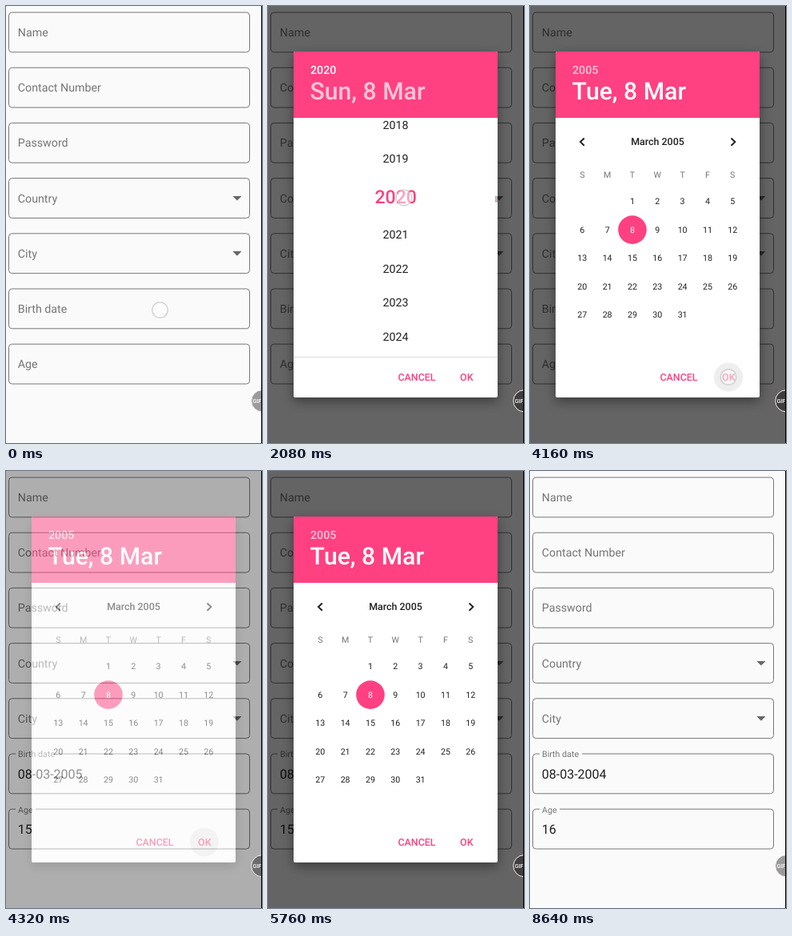
An HTML page that plays this animation: 320 px wide and 547 px high, repeating every 9600 ms.

```html
<!DOCTYPE html>
<html lang="en">
<head>
<meta charset="utf-8">
<title>Birth date picker</title>
<style>
  html, body { margin: 0; width: 100%; height: 100%; overflow: hidden; background: #fafafa; }
  svg { display: block; width: 100%; height: 100%; font-family: Roboto, sans-serif; text-rendering: geometricPrecision; }
  .dialog { filter: drop-shadow(0 5px 7px rgba(0, 0, 0, .4)); }
</style>
</head>
<body>
<svg id="stage" viewBox="0 0 320 547"></svg>
<script>
const LOOP = 9600, STEP = 160;
const PINK = '#ff4081', INK = '#212121', GREY = '#757575', PALE = 'rgba(255,255,255,.7)';
const ROW = 42.67;
const FIELDS = ['Name', 'Contact Number', 'Password', 'Country', 'City', 'Birth date', 'Age'];

// Each visit to the picker: fade in, open the year list, pick a year, confirm.
const VISITS = [
  { open: [320, 800], years: [1280, 1600], back: [3200, 3680], close: [4160, 4480], from: 2020, to: 2005 },
  { open: [5440, 5760], years: [6560, 6880], back: [7520, 7840], close: [8320, 8640], from: 2005, to: 2004 }
];

// start, end, x, y, vertical travel per step
const TOUCHES = [
  [0, 160, 192.5, 380.5, 0], [1120, 1440, 80, 87, 0], [2080, 2400, 170, 240, 80],
  [3040, 3360, 166, 248, 0], [4000, 4320, 248, 464.5, 0], [5280, 5600, 171.5, 376, 0],
  [6560, 6720, 76, 84, 0], [7520, 7680, 170, 191, 0], [8160, 8480, 248, 464.5, 0]
];

const ramp = (t, [a, b]) => Math.min(1, Math.max(0, (t - a) / (b - a)));
const during = (t, a, b) => t >= a && t < b;
const easeInOut = p => p * p * (3 - 2 * p);

// Text is placed by the vertical centre of its capitals.
const text = (s, x, y, size, fill, weight = 400, anchor = 'start') =>
  `<text x="${x}" y="${y + size * .357}" font-size="${size}" font-weight="${weight}" fill="${fill}" text-anchor="${anchor}">${s}</text>`;
const centred = (s, x, y, size, fill, weight) => text(s, x, y, size, fill, weight, 'middle');
const rect = (x, y, w, h, fill, extra = '') =>
  `<rect x="${x}" y="${y}" width="${w}" height="${h}" fill="${fill}" ${extra}/>`;
const circle = (x, y, r, fill, extra = '') =>
  `<circle cx="${x}" cy="${y}" r="${r}" fill="${fill}" ${extra}/>`;
const group = (opacity, content, extra = '') =>
  opacity > 0 ? `<g opacity="${opacity}" ${extra}>${content}</g>` : '';

function field(label, i, value) {
  const y = 8 + 69.2 * i;
  let out = rect(3.5, y, 301, 49.8, 'none', 'rx="4" stroke="#777"');
  if (value) {
    out += rect(12, y - 2, label === 'Age' ? 25 : 53, 4, '#fafafa');
    out += text(label, 15, y + .6, 10.67, GREY) + text(value, 14.8, y + 25, 16, INK);
  } else {
    out += text(label, 14.8, y + 25, 14.22, GREY);
  }
  if (label === 'Country' || label === 'City') {
    out += `<path d="M283.3 ${y + 22.3}h11.2l-5.6 5.6z" fill="#666"/>`;
  }
  return out;
}

function form(year) {
  const values = year ? { 'Birth date': '08-03-' + year, Age: String(2020 - year) } : {};
  return FIELDS.map((label, i) => field(label, i, values[label])).join('');
}

function calendar(year) {
  const firstDay = new Date(year, 2, 1).getDay();
  const column = i => 65.3 + 31.33 * i;
  let out = centred('March ' + year, 159.5, 170, 12.44, INK, 500) +
    `<path d="M67.8 165.5l-4.8 4.6 4.8 4.6M251.5 165.5l4.8 4.6-4.8 4.6" fill="none" stroke="${INK}" stroke-width="2"/>`;
  [...'SMTWTFS'].forEach((day, i) => { out += centred(day, column(i), 211, 10.67, GREY); });
  for (let day = 1; day <= 31; day++) {
    const cell = day - 1 + firstDay;
    const x = column(cell % 7), y = 244.6 + 35.5 * Math.floor(cell / 7);
    if (day === 8) out += circle(x, y, 17.8, PINK);
    out += centred(day, x, y, 10.67, day === 8 ? '#fff' : INK);
  }
  return out;
}

function yearList(selected, scroll, pressed) {
  let out = '';
  for (let year = 1980; year <= 2100; year++) {
    const d = year - selected;
    const y = 238.6 + d * ROW + Math.sign(d) * 4.7 + scroll;
    if (y < 110 || y > 470) continue;
    if (year === pressed) out += rect(82, y - 21.7, 155, 43, '#f6f6f6', 'rx="7"');
    out += d ? centred(year, 159.5, y, 14.22, INK) : centred(year, 159.7, y, 23.1, PINK, 500);
  }
  const position = (selected - 1980) * ROW - scroll;
  out += rect(283.8, 135.3 + .06 * position, 3.2, 8, '#bbb3b6');
  return `<g clip-path="url(#list)">${out}</g>` + rect(32, 439, 255, 1, '#dcdcdc');
}

function picker(t, visit) {
  const shown = ramp(t, visit.years), back = ramp(t, visit.back);
  const year = back > 0 ? visit.to : visit.from;
  const listAlpha = shown * (1 - back);
  const scroll = visit.from === 2020 ? 653.8 * easeInOut(ramp(t, [2080, 2880])) : 0;
  const pressed = during(t, visit.back[0], visit.back[0] + STEP) ? visit.to : 0;
  const weekday = ['Sun', 'Mon', 'Tue'][new Date(year, 2, 8).getDay()];
  const yearMode = listAlpha > .5;

  return rect(32, 57, 255, 433, '#fff', 'rx="2" class="dialog"') +
    `<path d="M32 140V59q0-2 2-2h251q2 0 2 2v81z" fill="${PINK}"/>` +
    text(year, 53, 80, 14.22, yearMode ? '#fff' : PALE, 500) +
    text(weekday + ', 8 Mar', 52.5, 106.5, 30.2, yearMode ? PALE : '#fff', 500) +
    group(1 - listAlpha, calendar(year)) +
    group(listAlpha, yearList(visit.from, scroll, pressed)) +
    (during(t, visit.close[0], visit.close[1]) ? circle(248, 464.5, 18, '#eee') : '') +
    centred('CANCEL', 186, 465, 12.44, PINK, 500) +
    centred('OK', 248.3, 465, 12.44, PINK, 500);
}

function touches(t) {
  return TOUCHES.filter(([a, b]) => during(t, a, b)).map(([a, , x, y, travel]) =>
    circle(x, y + travel * (t - a) / STEP, 9.8, 'rgba(255,255,255,.5)',
      'stroke="#c4c4c4" stroke-opacity=".75" stroke-width="1.5"')).join('');
}

function scene(t) {
  const picked = VISITS.filter(v => t > v.close[0]).pop();
  const visit = VISITS.find(v => t > v.open[0] && t < v.close[1]);
  const alpha = visit ? ramp(t, visit.open) * (1 - ramp(t, visit.close)) : 0;
  return '<clipPath id="list"><rect x="32" y="140" width="255" height="299"/></clipPath>' +
    rect(0, 0, 320, 547, '#fafafa') + form(picked && picked.to) +
    (visit ? group(alpha, rect(0, 0, 320, 547, '#000', 'opacity=".6"') + picker(t, visit)) : '') +
    circle(320.3, 494.3, 13.6, 'rgba(0,0,0,.38)', 'stroke="#fbeff2"') +
    text('GIF', 308.4, 494.5, 7, '#fff', 500) +
    rect(319, 0, 1, 547, '#000') + touches(t);
}

const stage = document.getElementById('stage');
let current = -1;
function draw() {
  const step = Math.floor(performance.now() % LOOP / STEP);
  if (step !== current) {
    current = step;
    stage.innerHTML = scene(step * STEP);
  }
  requestAnimationFrame(draw);
}
draw();
</script>
</body>
</html>
```
